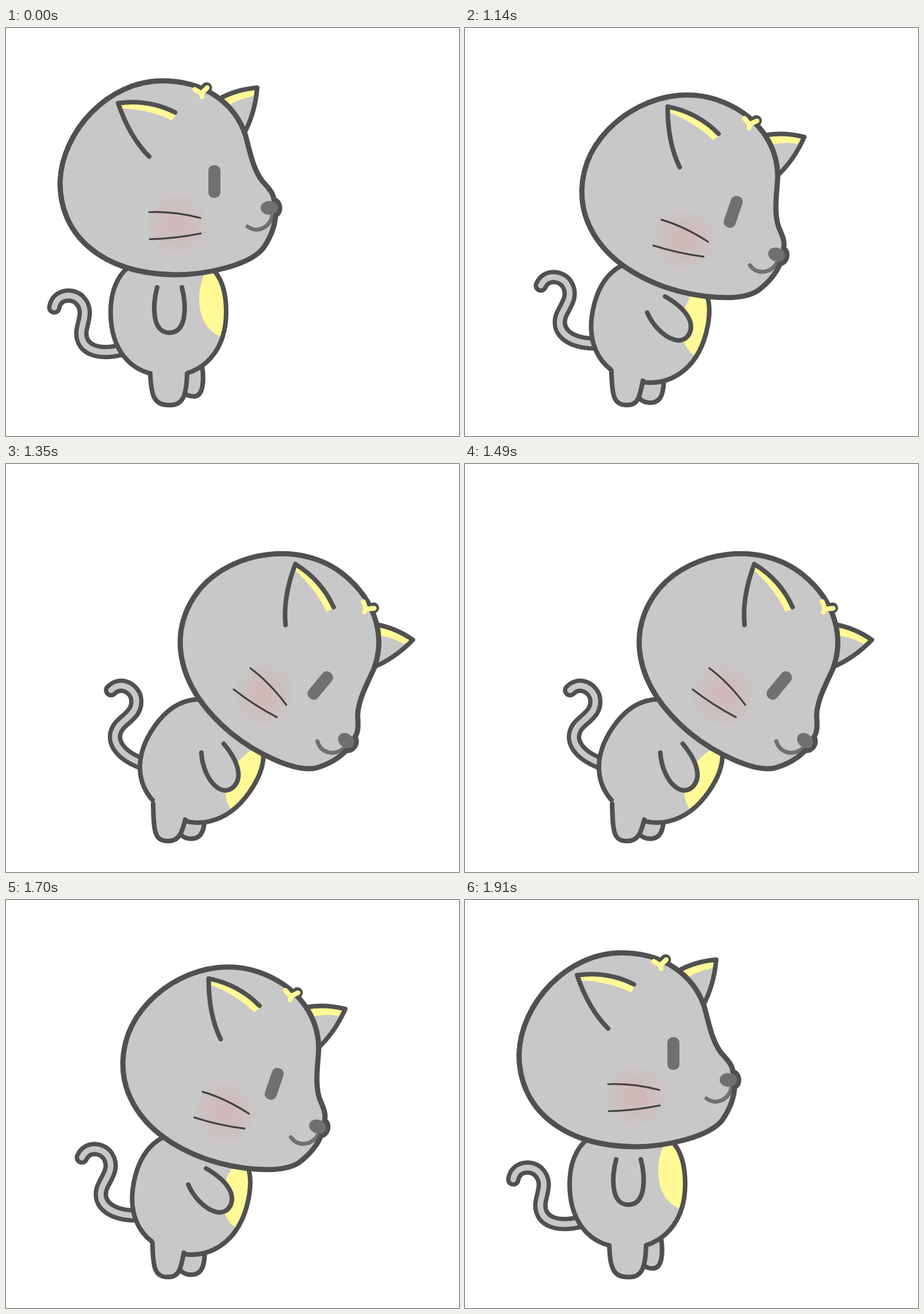
These frames come from a looping animation (788x711 px, 2910 ms). An HTML page with a canvas:

```html
<!DOCTYPE html>
<html lang="en">
<head>
<meta charset="utf-8">
<title>Bowing cat</title>
<style>
html, body { margin: 0; width: 100%; height: 100%; overflow: hidden; background: #fff; }
canvas { display: block; }
</style>
</head>
<body>
<canvas id="stage" width="788" height="711"></canvas>
<script>
const ctx = document.getElementById('stage').getContext('2d');
const LINE = '#505050', FUR = '#c8c8c8', YELLOW = '#fff996', SOFT = '#707070';
const REST = 1000, STEP = 70, DEEPEST = 7, LOOP = 2910;
const BODY_PIVOT = [283, 500], HEAD_PIVOT = [195, 131];

const shape = d => new Path2D(d);
const tail = shape('M84 487C88 463 115 462 127 473C147 492 131 515 131 532C131 560 160 571 200 561');
const torso = shape('M182 495C182 445 205 395 283 395C368 395 383 445 383 495C383 560 345 606 283 606C209 606 182 552 182 495Z');
const belly = shape('M352 415C327 455 329 521 374 538L400 538L400 415Z');
const armDown = shape('M263 452C255 482 253 531 284 531C315 531 314 484 306 452');
const armBent = shape('M275 486C288 503 312 520 333 520C354 520 361 499 351 482C341 467 320 457 298 451');

const head = shape('M94 268C97 180 178 92 272 92C348 92 398 133 416 185C424 213 429 245 446 267C458 280 465 288 466 299C479 303 479 322 469 326C468 345 462 362 448 383C425 413 350 430 294 430C165 428 93 360 94 268Z');
const farEar = shape('M370 124Q400 107 437 104Q433 150 413 186');
const farEarRim = shape('M368 124Q400 107 435 106L430 119Q406 123 384 137Z');
const nearEar = shape('M249 224Q215 190 195 131Q248 124 294 147');
const nearEarRim = shape('M197 132Q250 126 297 148L289 161Q250 142 201 140Z');
const tuft = shape('M328 107L340 114L350 104M340 114L341 120');
const mouth = shape('M420 346C437 358 459 349 464 325');
const whiskers = shape('M249 321Q290 319 338 331M250 368Q295 367 339 358');

function fill(path, color) {
  ctx.fillStyle = color;
  ctx.fill(path);
}

function stroke(path, width, color = LINE) {
  ctx.strokeStyle = color;
  ctx.lineWidth = width;
  ctx.stroke(path);
}

function posed(pivot, [x, y, degrees], draw) {
  ctx.save();
  ctx.translate(x, y);
  ctx.rotate(degrees * Math.PI / 180);
  ctx.translate(-pivot[0], -pivot[1]);
  draw();
  ctx.restore();
}

function ellipse(x, y, rx, ry, color) {
  ctx.fillStyle = color;
  ctx.beginPath();
  ctx.ellipse(x, y, rx, ry, 0, 0, Math.PI * 2);
  ctx.fill();
}

function drawTail() {
  stroke(tail, 25);
  stroke(tail, 10, FUR);
}

function drawTorso() {
  fill(torso, FUR);
  ctx.save();
  ctx.clip(torso);
  fill(belly, YELLOW);
  ctx.restore();
  stroke(torso, 8);
}

function drawBackLeg(standing) {
  const leg = standing
    ? 'M341 588C345 615 343 642 327 642C320 642 315 641 310 636'
    : 'M346 600C347 640 340 653 322 653C315 653 309 651 304 646';
  fill(shape(leg + 'L300 590Z'), FUR);
  stroke(shape(leg), 8);
}

function drawFrontLeg([lx, ly, rx, ry], standing) {
  const sole = standing ? `C308 659 314 640 ${rx} ${ry}` : `C302 657 ${rx - 5} 640 ${rx} ${ry}`;
  const leg = `M${lx} ${ly}C${lx + 1} 640 258 658 283 657${sole}`;
  fill(shape(`${leg}L${rx - 2} ${ry - 8}L${lx + 4} ${ly - 8}Z`), FUR);
  stroke(shape(leg), 8);
}

function drawArm(arm) {
  fill(arm, FUR);
  stroke(arm, 8);
}

function drawBlush() {
  const glow = ctx.createRadialGradient(297, 342, 0, 297, 342, 54);
  const tint = alpha => `rgba(222,158,158,${alpha})`;
  glow.addColorStop(0, tint(.42));
  glow.addColorStop(.5, tint(.26));
  glow.addColorStop(1, tint(.04));
  ellipse(297, 342, 54, 54, glow);
}

function drawHead() {
  fill(farEar, FUR);
  fill(farEarRim, YELLOW);
  stroke(farEar, 8);
  ellipse(349, 104, 9.5, 9.5, LINE);
  fill(head, FUR);
  drawBlush();
  stroke(whiskers, 3.2, '#404040');
  stroke(mouth, 7, SOFT);
  stroke(head, 9);
  ellipse(458, 313.5, 15, 12, SOFT);
  fill(nearEarRim, YELLOW);
  stroke(nearEar, 8);
  stroke(tuft, 8.5, YELLOW);
  ctx.fillStyle = SOFT;
  ctx.beginPath();
  ctx.roundRect(352, 239, 21, 57, 9.5);
  ctx.fill();
}

const standingPose = {
  body: [...BODY_PIVOT, 0],
  head: [...HEAD_PIVOT, 0],
  leg: [251, 602, 315, 602]
};

// The body settles into the bow while the head swings along a flat arc.
function bowPose(step) {
  const u = step / (DEEPEST - 1);
  const settle = u * (2 - u);
  const tilt = 5.93 * step + 2.47 * Math.max(0, step - 4);
  return {
    body: [298.5 + 41 * settle, 506.5 + 15 * u, 1 + 6.8 * step],
    head: [246 + 9.55 * tilt - .048 * tilt ** 2, 131 + .042 * tilt ** 2, 7.1 + tilt],
    leg: [253 + 3 * settle, 604 - 12 * settle, 306 + 6 * settle, 608 + 12 * settle]
  };
}

function depthAt(t) {
  if (t < REST) return 0;
  const step = Math.floor((t - REST) / STEP) + 1;
  return Math.max(0, DEEPEST - Math.abs(DEEPEST - step));
}

function draw(depth) {
  const standing = depth === 0;
  const pose = standing ? standingPose : bowPose(depth - 1);
  const onBody = part => posed(BODY_PIVOT, pose.body, part);
  ctx.fillStyle = '#fff';
  ctx.fillRect(0, 0, 788, 711);
  ctx.lineCap = ctx.lineJoin = 'round';
  onBody(drawTail);
  drawBackLeg(standing);
  onBody(drawTorso);
  drawFrontLeg(pose.leg, standing);
  onBody(() => drawArm(standing ? armDown : armBent));
  posed(HEAD_PIVOT, pose.head, drawHead);
}

const start = performance.now();
function tick() {
  draw(depthAt((performance.now() - start) % LOOP));
  requestAnimationFrame(tick);
}
tick();
</script>
</body>
</html>
```
